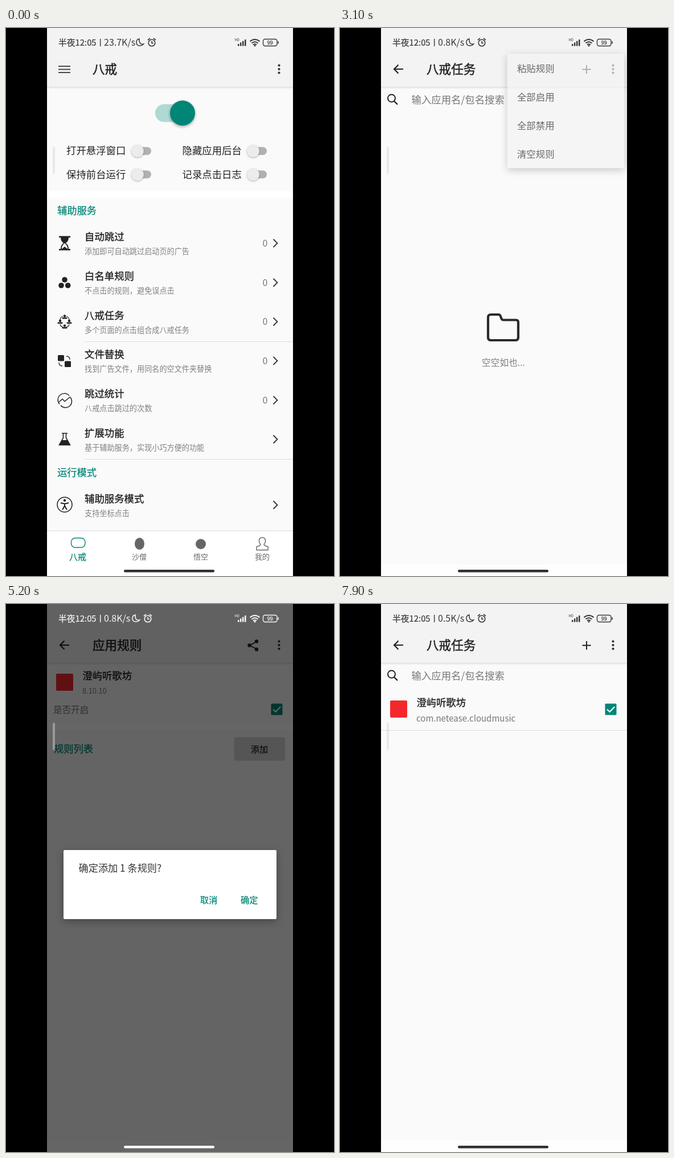
Animation of 576x960 px, one loop 8 s. Source, as an HTML page:

```html
<!DOCTYPE html>
<html lang="zh-CN">
<head>
<meta charset="utf-8">
<style>
html, body { margin: 0; width: 100%; height: 100%; overflow: hidden; background: #000; }
#stage { display: block; width: 100vw; height: 100vh; }
text { font-family: "Noto Sans CJK SC", "Noto Sans CJK", "Noto Sans", sans-serif; white-space: pre; }
.lift { filter: drop-shadow(0 4px 7px rgba(0,0,0,.3)); }
.low { filter: drop-shadow(0 1px 1.5px rgba(0,0,0,.3)); }
.mid { filter: drop-shadow(0 2px 2.5px rgba(0,0,0,.35)); }
</style>
</head>
<body>
<svg id="stage" viewBox="0 0 576 960"></svg>
<script>
const TEAL = '#008577', INK = '#222', GREY = '#777', RED = '#f3282c';
const APP = '澄屿听歌坊', PKG = 'com.netease.cloudmusic';
const LOOP = 8000, STEP = 100, W = 432;

// ---- drawing helpers; text is placed by its vertical centre ----
const text = (x, cy, size, str, fill = INK, bold = 0, anchor = 'start') =>
  `<text x="${x}" y="${(cy + size * .37).toFixed(1)}" font-size="${size}" fill="${fill}" text-anchor="${anchor}"` +
  (bold ? ` stroke="${fill}" stroke-width="${bold}"` : '') + `>${str}</text>`;
const rect = (x, y, w, h, fill, r = 0, more = '') =>
  `<rect x="${x}" y="${y}" width="${w}" height="${h}" fill="${fill}" rx="${r}" ${more}/>`;
const dot = (x, y, r, fill, more = '') => `<circle cx="${x}" cy="${y}" r="${r}" fill="${fill}" ${more}/>`;
const line = (d, color = INK, w = 2, more = '') =>
  `<path d="${d}" fill="none" stroke="${color}" stroke-width="${w}" ${more}/>`;
const solid = (d, fill = INK) => `<path d="${d}" fill="${fill}"/>`;
const group = (id, body, more = '') => `<g id="${id}" ${more}>${body}</g>`;

const back = line('M111 72H95M102.500 64.500L95 72l7.500 7.500', INK, 2.2);
const more = [65.5, 72, 78.5].map(y => dot(479.5, y, 2.1, '#333')).join('');
const check = (x, y) => rect(x, y, 20, 20, TEAL, 1.5) +
  line(`M${x + 3.5} ${y + 10}l4.500 4.500l8.700 -9`, '#fff', 2);
const rule = (x, y) => rect(x, y, 504 - x, 1, '#dcdcdc');

function page(title, icons) {
  return rect(72, 0, W, 960, '#fafafa') + rect(72, 0, W, 103, '#f3f3f3') +
    rect(72, 103, W, 4, 'url(#fade)') + text(152, 72, 21.6, title, INK, .5) + icons;
}

const toggle = (x, y) => rect(x - 7, y - 7, 31, 14, '#b1b1b1', 7) + dot(x, y, 10.8, '#ececec', 'class="low"');

const rowIcons = [
  solid('M93 364.500h20v2.500h-20zM93 387h20v2.500h-20zM96 367h14q0 7 -5.500 10h-3q-5.500 -3 -5.500 -10z') +
    line('M102 377q-5 3 -5 10M104 377q5 3 5 10', INK, 1.8) + solid('M98 387l5 -4l5 4z'),
  dot(103, 441, 4.8, INK) + dot(97, 451, 4.8, INK) + dot(108.7, 451, 4.8, INK),
  line('M95 511q1 -5 5 -6M106 505q4 1 5 6M95 519q1 4 5 5M106 524q4 -1 5 -5', INK, 1.2) +
    dot(103, 504.5, 2.2, INK) + rect(98.5, 507, 9, 2.5, INK, 1) +
    dot(103, 521.5, 2.2, INK) + rect(98.5, 524, 9, 2.5, INK, 1) +
    dot(95, 513, 2.2, INK) + rect(90.5, 515.5, 9, 2.5, INK, 1) +
    dot(111, 513, 2.2, INK) + rect(106.5, 515.5, 9, 2.5, INK, 1),
  rect(91, 573, 11, 10.5, INK, 1.5) + rect(103, 583.5, 11, 10.5, INK, 1.5) +
    line('M106 575q6 0 6 6M93 586q0 6 6 6', INK, 1.3),
  line('M94 659a11 11 0 0 1 17 -15M113 647a11 11 0 0 1 -17 14', INK, 1.4) +
    line('M92 656l7 -6l4 4l10 -8', INK, 1.5),
  line('M98 710h10M100.500 710v8l-7 12.500h19l-7 -12.500v-8', INK, 1.6) + solid('M98 722h10l5 9h-20z'),
  line('M116 835a13 13 0 1 1 -26 0a13 13 0 1 1 26 0z', INK, 1.5) + dot(103, 827.5, 2.2, INK) +
    line('M96 832l7 1.500l7 -1.500M103 833v4l-4 7M103 837l4 7', INK, 2)
];

const rows = [
  ['自动跳过', '添加即可自动跳过启动页的广告', 377, 1],
  ['白名单规则', '不点击的规则，避免误点击', 446, 1],
  ['八戒任务', '多个页面的点击组合成八戒任务', 514.5, 1],
  ['文件替换', '找到广告文件，用同名的空文件夹替换', 583, 1],
  ['跳过统计', '八戒点击跳过的次数', 652, 1],
  ['扩展功能', '基于辅助服务，实现小巧方便的功能', 720.5, 0],
  ['辅助服务模式', '支持坐标点击', 835.5, 0]
];

const listRows = rows.map(([name, note, y, count], i) =>
  rowIcons[i] + text(138, y - 11, 17.4, name, INK, .35) + text(138, y + 14.5, 13.15, note, '#808080') +
  (count ? text(455, y, 16, '0', GREY, 0, 'middle') : '') +
  line(`M469.500 ${y - 7}l7 7l-7 7`, '#333', 1.8)).join('');

const tabs = ['八戒', '沙僧', '悟空', '我的'].map((s, i) =>
  text(126 + 108 * i, 926, i ? 13 : 15, s, i ? '#6a6a6a' : TEAL, i ? 0 : .25, 'middle')).join('');

const home = page('八戒', line('M92 67h21M92 72.500h21M92 78h21', '#4a4a4a', 2) + more) +
  rect(262, 133.5, 60, 31, '#b0d9d3', 15.5) + dot(310, 149, 22, TEAL, 'class="mid"') +
  text(106, 215, 17.4, '打开悬浮窗口') + toggle(231, 215.5) +
  text(309.5, 215, 17.4, '隐藏应用后台') + toggle(434, 215.5) +
  text(106, 256.5, 17.4, '保持前台运行') + toggle(231, 256.5) +
  text(309.5, 256.5, 17.4, '记录点击日志') + toggle(434, 256.5) +
  rect(72, 286, W, 11, '#fff') +
  text(90, 320, 17.3, '辅助服务', TEAL, .25) + text(90, 778.5, 17.3, '运行模式', TEAL, .25) +
  listRows + rule(138, 549) + rule(138, 755) +
  rect(72, 480, W, 69.5, 'url(#press)', 0, 'id="press-row"') +
  rect(72, 881, W, 79, '#fff') + rect(72, 880, W, 1.5, '#e4e4e4') + tabs +
  rect(114.5, 893.5, 24.5, 16.5, 'none', 7, `stroke="${TEAL}" stroke-width="1.4"`) +
  '<ellipse cx="234.500" cy="903.500" rx="8.500" ry="10.500" fill="#666"/>' +
  '<ellipse cx="342" cy="904" rx="9" ry="9" fill="#666"/>' +
  line('M450 892.500q5.500 0 5.500 6q0 4 -2.500 6.500q1 2.500 7 3.500v6h-20v-6q6 -1 7 -3.500q-2.500 -2.500 -2.500 -6.500q0 -6 5.500 -6z', '#666', 1.4);

const footer = rect(72, 940, W, 20, '#fefefe');
const appHead = (y, second) => rect(88, y, 30, 30, RED, 2) + text(134.5, y + 4, 17.3, APP, INK, .35) + second;

const tasks = page('八戒任务', back + line('M433 65v15M425.500 72.500h15', INK, 2) + more) +
  dot(90.5, 123, 6.5, 'none', `stroke="${INK}" stroke-width="2"`) + line('M95 128l6 6', INK, 2.3) +
  text(125.5, 126, 17.4, '输入应用名/包名搜索', GREY) + footer +
  group('empty',
    line('M265 502h13.500q2 0 3 2l2 5q1 2.500 3.500 2.500h22q4 0 4 4v26.500q0 5 -5 5h-43q-5 0 -5 -5v-35q0 -5 5 -5z', '#2b2b2b', 4.2) +
    text(287, 586, 15.7, '空空如也...', '#808080', 0, 'middle')) +
  group('filled', appHead(169, text(134, 200, 15, PKG, GREY)) + check(465.5, 174.5) + rule(72, 221));

const share = line('M440 66L428 72.500L440 79', INK, 1.8) +
  dot(440, 65.5, 3.2, INK) + dot(427.5, 72.5, 3.2, INK) + dot(440, 79.5, 3.2, INK);

const rules = page('应用规则', back + share + more) +
  appHead(122, text(134, 152, 12.8, '8.10.10', GREY)) +
  text(83, 185, 15.5, '是否开启', GREY) + check(465.5, 174.5) +
  rect(72, 208, W, 13, '#fff') + text(84, 253.5, 17.3, '规则列表', TEAL, .25) +
  rect(400.5, 233.5, 89.5, 41, '#d6d6d6', 1) + text(445, 254, 15.2, '添加', INK, .25, 'middle') + footer +
  group('item', text(83, 305, 13.2, '未设置描述', GREY) +
    text(83, 328, 13.6, PKG + '.activity.MainActivity', INK, .25) + check(454, 303.5) + rule(72, 347));

const menu = rect(283, 45, 216, 211, '#f4f4f4', 2, 'class="lift"') +
  ['粘贴规则', '全部启用', '全部禁用', '清空规则'].map((s, i) => text(301, 72 + 52.7 * i, 17.3, s)).join('');

const dialog = rect(101, 431, 374, 121, '#fff', 2, 'class="lift"') +
  text(127.5, 463, 17.2, '确定添加 1 条规则?', '#333') +
  text(341, 518, 15.2, '取消', TEAL, .25) + text(412, 518, 15.2, '确定', TEAL, .25);

// status bar inherits its tone from currentColor
const C = 'currentColor';
const status = text(92, 25.5, 14.8, '半夜12:05', C, .2) + rect(165, 19, 1.4, 13, C) +
  `<text id="rate" x="172" y="31.300" font-size="16" fill="${C}"></text>` +
  group('mood', line('M234 19q-5 1 -5 6q0 6 6 6q4 0 6.500 -3q-8 2 -7.500 -9z', C, 1.5) +
    dot(256, 26, 5.8, 'none', `stroke="${C}" stroke-width="1.6"`) +
    line('M249 21l4 -3M263 21l-4 -3M256 23v3.500h3', C, 1.6)) +
  text(401.5, 21, 6, 'HD', C) + [0, 1, 2, 3].map(i => rect(407 + 4 * i, 28 - 2.6 * i, 2.5, 3.5 + 2.6 * i, C)).join('') +
  line('M428.500 23.500q8.500 -7 17 0M431.500 26.500q5.500 -4.500 11 0M434 29.300q3 -2 6 0', C, 2) + dot(437, 31, 1.5, C) +
  rect(451.5, 19.5, 24.5, 12, 'none', 3.5, `stroke="${C}" stroke-width="1.4"`) + rect(477.3, 23.5, 1.6, 4, C) +
  text(463.7, 25.5, 9, '99', C, .2, 'middle');

document.getElementById('stage').innerHTML = `<defs>
  <linearGradient id="fade" x2="0" y2="1"><stop stop-color="#dedede"/><stop offset="1" stop-color="#fafafa"/></linearGradient>
  <linearGradient id="press"><stop offset=".15" stop-opacity=".36"/><stop offset=".37" stop-opacity=".26"/><stop offset=".76" stop-opacity=".25"/><stop offset=".86" stop-opacity=".2"/></linearGradient>
</defs>` + rect(0, 0, 576, 960, '#000') +
  '<svg x="72" width="432" height="960" viewBox="72 0 432 960" overflow="hidden">' +
  group('home', home) + group('tasks', tasks) + group('rules', rules) + group('menu', menu) +
  rect(72, 0, W, 960, '#000', 0, 'id="dim"') + group('dialog', dialog) +
  dot(0, 0, 12.5, '#fff', 'id="touch" fill-opacity=".5" stroke="#888" stroke-opacity=".35"') +
  group('chrome', status) + rect(82, 208, 4, 48, '#d5d5d5', 2, 'opacity=".47"') +
  rect(207, 949, 159, 4.5, '#000', 2.2, 'id="pill"') + '</svg>';

// ---- motion ----
const el = {};
document.querySelectorAll('[id]').forEach(n => el[n.id] = n);
const set = (id, name, v) => el[id].setAttribute(name, v);
const move = (id, x, y = 0) => set(id, 'transform', `translate(${x.toFixed(1)} ${y})`);
const fade = (id, v) => set(id, 'opacity', v);

function glide(ms) {
  if (ms <= 0) return 0;
  if (ms > 700) return 1;
  const x = ms * .0105;
  return 1 - (1 + x) * Math.exp(-x);
}

function track(t, keys) {
  let [t0, v0] = keys[0];
  for (const [t1, v1] of keys) {
    if (t < t1) return t <= t0 ? v0 : v0 + (v1 - v0) * (t - t0) / (t1 - t0);
    t0 = t1; v0 = v1;
  }
  return v0;
}

const taps = [[2900, 3100, 479, 72], [4200, 4400, 445, 72], [5300, 5700, 434, 518]];

function draw(t) {
  const open = glide(t - 2095), edit = glide(t - 4312), leave = glide(t - 7095);
  move('home', -W / 2 * open);
  move('tasks', W * (1 - open) - W / 2 * (edit - leave));
  move('rules', W * (1 - edit + leave));
  move('dialog', W * (1 - edit));

  fade('press-row', track(t, [[1900, 0], [2000, .5], [2100, 1], [2300, 1], [2600, 0]]));
  fade('menu', track(t, [[2900, 0], [3200, 1], [4200, 1], [4300, .94], [4400, 0]]));
  const grow = track(t, [[2900, .85], [3200, 1]]);
  set('menu', 'transform', `translate(${499 * (1 - grow)} ${45 * (1 - grow)}) scale(${grow})`);
  fade('dim', track(t, [[4200, 0], [4300, .035], [4400, .32], [4500, .6], [5500, .6], [5600, .5], [5700, .26], [5900, 0]]));
  fade('dialog', track(t, [[5500, 1], [5600, .71], [5800, 0]]));

  const tap = taps.find(([a, b]) => t >= a && t < b);
  fade('touch', tap ? 1 : 0);
  if (tap) move('touch', tap[2], tap[3]);

  fade('item', t >= 5500 ? 1 : 0);
  fade('empty', t < 5500 ? 1 : 0);
  fade('filled', t < 5500 ? 0 : 1);

  el.rate.textContent = t < 2000 ? '23.7K/s' : t < 6000 ? '0.8K/s' : '0.5K/s';
  move('mood', t < 2000 ? 0 : -7);
  const light = track(t, [[4300, 0], [4500, .6], [4700, 1], [5600, 1], [5900, 0]]);
  const tone = Math.round(56 + 192 * light);
  set('chrome', 'color', `rgb(${tone},${tone},${tone})`);
  const bar = Math.round(48 + 200 * light);
  set('pill', 'fill', `rgb(${bar},${bar},${bar})`);
}

function tick() {
  draw(Math.floor(performance.now() % LOOP / STEP) * STEP);
  requestAnimationFrame(tick);
}
tick();
</script>
</body>
</html>
```
